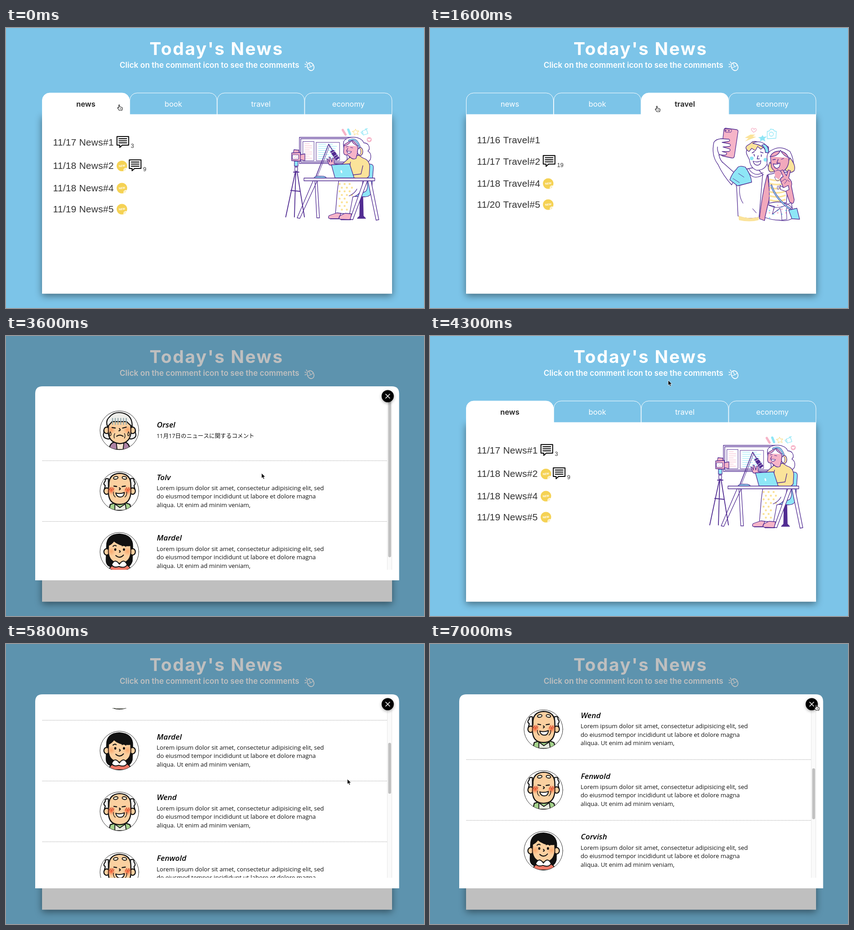
An HTML page with a canvas for the animation above (7.1 s loop, 916 by 612 pixels).

```html
<!DOCTYPE html>
<html lang="en">
<head>
<meta charset="utf-8">
<title>Today's News</title>
<style>
html, body { margin: 0; width: 100%; height: 100%; overflow: hidden; background: #7cc4e8; }
canvas { display: block; }
</style>
</head>
<body>
<canvas id="stage" width="916" height="612"></canvas>
<script>
const ctx = document.getElementById('stage').getContext('2d');
const LOOP = 7100, SKY = '#7cc4e8', INK = '#512c92', PINK = '#f6b4c8', CYAN = '#8ee6f6', YELLOW = '#fbe39a';
const ROSE = '#f1a8bc', SKIN = '#fbd0a0', BLACK = '#111';
const HEAD = 'Inter, sans-serif', LIST = '"Liberation Sans", Arial, sans-serif';
const BODY = '"Open Sans", "Noto Sans CJK JP", sans-serif';

const clamp = v => Math.max(0, Math.min(1, v));
const ease = v => { v = clamp(v); return v * v * (3 - 2 * v); };
const ramp = (t, from, to) => clamp((t - from) / (to - from));

function draw(d, fill, stroke = INK, width = 1.3) {
  const path = new Path2D(d);
  if (fill) { ctx.fillStyle = fill; ctx.fill(path); }
  if (stroke) { ctx.strokeStyle = stroke; ctx.lineWidth = width; ctx.stroke(path); }
}
function oval(x, y, rx, ry, fill, stroke = INK, width = 1.3, turn = 0) {
  ctx.beginPath();
  ctx.ellipse(x, y, rx, ry, turn, 0, Math.PI * 2);
  if (fill) { ctx.fillStyle = fill; ctx.fill(); }
  if (stroke) { ctx.strokeStyle = stroke; ctx.lineWidth = width; ctx.stroke(); }
}
function text(s, x, y, size, { family = BODY, weight = 400, color = '#333', align = 'left', spacing = 0, style = '' } = {}) {
  ctx.font = `${style} ${weight} ${size}px ${family}`;
  ctx.letterSpacing = spacing + 'px';
  ctx.textAlign = align;
  ctx.fillStyle = color;
  ctx.fillText(s, x, y);
}
function at(x, y, fn, turn = 0) {
  ctx.save();
  ctx.translate(x, y);
  ctx.rotate(turn);
  fn();
  ctx.restore();
}

function officeArt() {
  draw('M738 223l6 10', '', PINK, 5);
  draw('M750 222l4 10', '', CYAN, 5);
  draw('M766 221l2 4 5 0-3 4 2 4-5-2-4 3 0-5-4-3 5-1z', '', YELLOW);
  draw('M781 225l9-3 3 9-10 3zM781 226l-3 2 3 4M787 221l5-1', '', CYAN);
  oval(796, 244, 5.5, 5.5, PINK, null);
  draw('M796 247q-6-4-2-5l2 1q4-3 3 1z', '#fff', null);

  draw('M643 239h119v57h-119zM646 242h113v51h-113z', '#fff');
  draw('M651 248h24v42h-24zM680 250h51v40h-51z', '#fff', INK, 1);
  for (let i = 0; i < 8; i++) {
    draw(`M655 ${253 + i * 4.5}h${i % 3 ? 15 : 10}`, '', PINK, 1);
    draw(`M685 ${254 + i * 4.5}h${16 + i % 3 * 3}m5 0h${10 + i % 2 * 6}`, '', CYAN, 1);
  }

  draw('M791 298q15-3 14 8l-4 52q-2 11-15 11l-22-1v-8l20-1q7-1 8-12z', CYAN);
  draw('M776 369h6l1 42 5 5h-18l5-5z', INK);

  draw('M740 248c8-13 38-13 44 3 12 0 15 13 9 18 10 6 8 22-2 24l-44-4c4-15-11-23-7-41z', '#fff');
  draw('M753 283l20-5 9 6q14 4 15 18l-1 21q-8 11-22 7l-26-1 4-31-25 8-9-9 17 2z', YELLOW);
  draw('M782 301l-4 18-25 3M755 293l-3 15', '');
  draw('M753 283l-4-6q-11 3-9-11l1-11q8-5 16-10 13 6 15 22l-5 18q-7 4-14-4z', PINK);
  draw('M741 257q9 0 16-11 5 10 16 12', '#fff');
  draw('M745 260l5-1m5 2l5 1M749 263l-3 6 4 1', '', INK, 1.2);
  draw('M748 273q7 2 9-3l-9-1z', '#fff', INK, 1.2);
  draw('M752 246q16-9 24 17', '', INK, 4);
  draw('M752 246q16-9 24 17', '', CYAN, 2.3);
  oval(776, 270, 6, 9, YELLOW);
  oval(774, 270, 3.5, 7, '#fff', INK, 1);
  draw('M708 299l-5-13 3 1 3 6-1-11 3 1 3 10 2-9 3 1v11l7 2-3 4z', PINK);

  draw('M679 325l28-71 14 22', '', INK, 1.7);
  draw('M682 325l28-69', '', INK, 1);
  draw('M711 270l7-3 12 17-7 5z', INK);
  draw('M713 273l8-4m-3 12l8-5m-5 9l7-5', '', '#fff', 1);
  draw('M675 328q1-5 13-4 13-1 14 4z', CYAN);
  draw('M713 299l40-2 10 31h-42z', CYAN);
  draw('M721 328h44', '', INK, 2);
  oval(735, 314, 1.7, 3.2, '#fff', null, 0, -.2);

  draw('M729 334h53l-2 17q-7 16-20 18l-7 37-31-1 4-48z', '#fff');
  for (let i = 0; i < 24; i++) {
    const row = Math.floor(i / 3), x = 731 + i % 3 * 11 + row % 2 * 5, y = 341 + row * 8;
    if (y < 367 || x < 750) oval(x, y, 2.3, 2.3, YELLOW, null);
  }
  draw('M752 367q12-5 17-15', '');
  draw('M725 404l-17 6q-4 6 3 7h18l5-12zM743 405l-12 6q-4 6 2 7l22 1 2-13z', PINK);
  draw('M711 417h18m5 2h21', '', INK, 2);

  draw('M673 334l-35 81 6 1 38-82zM677 334l4 81h6l-5-81z', '#fff');
  draw('M784 334l-30 84 6 1 32-85zM793 334l18 86 6-1-17-85z', '#fff');
  draw('M653 328h155v6h-155z', '#fff');

  draw('M634 315l-21 98m22-98l-3 98m6-98l16 98M630 315h12M624 355l20 2', '', INK, 1.8);
  draw('M633 304h6v9h-6z', '#fff');
  draw('M632 291h8v11h-8z', CYAN);
  draw('M630 272l1-6 11 1v5M626 273l19-1v19l-19-1zM645 277l10-2v15l-10-2z', PINK);
  draw('M628 277h13v10h-13z', '#fff', INK, 1);
  draw('M631 284l6-5m-2 6l4-3', '', PINK, 1);
}

function selfieArt() {
  draw('M709 228q-8-7-3-9 3-1 4 3 3-4 5-1 2 3-6 7z', '', PINK);
  draw('M702 233l11 0-6 4 8 1-25 10 8-7-8-1z', YELLOW, null);
  draw('M729 234l2 4 7-1-5 5 2 6-6-3-6 3 1-6-5-3 7-1z', CYAN, null);
  draw('M739 226l5-1 2-4 7 1 1 3 5 1-1 15-19 1z', '', CYAN);
  oval(748, 232, 4.5, 4.5, '', CYAN);

  draw('M648 219l23 3q5 1 4 5l-8 53q-1 5-6 4l-19-4q-5-1-4-6l6-51q1-4 4-4z', PINK);
  draw('M647 221h12q4 3 0 7h-11q-4-3-1-7z', PINK, INK, 1);
  oval(648, 224.5, 1.5, 1.5, INK, null);
  oval(655, 224.5, 1.5, 1.5, INK, null);
  draw('M622 250q4-7 16-8l17 1q4 3-1 5l-14 2 16 3q5 3 0 6l-14 1 14 4q4 3-1 6l-15 0 10 3q1 4-4 5l-13-1q3 14 11 19l28 25-11 22q-19-21-30-45-15-19-9-48z', '#fff');
  draw('M630 260q-1 8 4 17', '');

  draw('M690 309q-20 0-22 20l4 20 3 62q21 8 46 3l8-94-14-16z', '#fff');
  draw('M676 410q22 9 45 3l-1 7q-19 5-43 0z', YELLOW, null);
  draw('M698 307q12 20 32 9m-35-6q11 26 36 10M679 345q-3 23 7 38M707 395l8 9', '', INK, 1.1);
  draw('M691 304q-15-5-19 4-10 9-15 24l17 13q13-3 31-8-2-17-14-33z', CYAN);
  draw('M676 318l12 8m-24 3l14 9', '', INK, 1);

  draw('M697 264q-7 5-1 16l4 8q2 18 16 23 23 0 25-25l1-26-19-9q-14 5-26 13z', '#fff');
  draw('M699 270q-11-7-4-13l8-5q4-6 15-3l17 8-10 8-7-6-5 9-8-5z', YELLOW);
  draw('M707 252q15-8 28 3 8 5 7 17l-7 0q2-14-28-20z', '#fff');
  draw('M733 254q10 5 9 19l-7-1q0-10-8-16z', CYAN);
  oval(705, 285, 4, 4, CYAN, null);
  oval(735, 288, 4, 4, CYAN, null);
  draw('M710 276l1 4m15-3v4M719 279l-2 7 5 0M706 273l5-3m13 1l6 2', '', INK, 1.6);
  draw('M708 291q10 4 17-1 0 10-8 10-7-1-9-9z', '#fff');

  draw('M739 288q-3-16 12-22 18-10 38 4 8 15 8 33-5 14-15 13l-36-6q-10-11-7-22z', '#fff');
  draw('M789 284q14 17 9 28-10 9-21-3zM745 293q-8 16 1 22l10-1z', YELLOW);
  draw('M746 280q6-11 19-11 15 1 21 15 2 20-13 30-18 5-25-10z', ROSE);
  draw('M745 281q18 0 23-14 6 13 20 17', '#fff');
  draw('M751 288l6-1m13 0l5-2M763 287l-3 8 4 0', '', INK, 1.3);
  draw('M752 297q9 2 15-2 0 11-7 12-6-1-8-10z', '#fff');

  draw('M739 321q-11 40-17 96l11 4 12-55-5-44z', ROSE);
  draw('M741 320l12-2 9-8 15 8 8 9-4 55-38 2q2-36-2-64z', '#fff');
  for (let i = 0; i < 6; i++) draw(`M745 ${331 + i * 9}q18 5 33-1`, '', YELLOW, 3.5);
  draw('M755 314l8-3 8 7-6 13-9-5z', ROSE, null);
  draw('M755 325q5 17 14 3', '', INK, 1);
  draw('M774 348l-5-12q-3-9 5-11l-6-13 5-2 8 13 4-13 5 2-4 16q9 7 6 18l6 29q-1 14-10 5l-9-26z', ROSE);
  draw('M770 336l8-6 4 4-5 6M783 332l5 4', '', INK, 1);
  draw('M767 344l8 5 10-5 2 9-8 4-11-4z', '#fff');
  oval(763, 349, 2, 4, '#fff', INK, 1);
  draw('M741 384q22-8 43 1l8-3 5 32q-13 10-32 6-16 0-31-6z', '#fff');
  for (let i = 0; i < 16; i++) oval(744 + i % 5 * 9, 388 + Math.floor(i / 5) * 8 + i % 2 * 3, 1.7, 1.7, i % 2 ? CYAN : PINK, null);
  draw('M741 386q20 13 43-1l10 8-13 1 1 24-11 2q0-15-4-26l-17 13 5-17z', '', INK, 1.1);
  draw('M748 344q9 29 43 53', '', INK, 4);
  draw('M748 344q9 29 43 53', '', CYAN, 2);
  draw('M786 398l18-4 6 24-17-1z', CYAN);
}

function blush(color) {
  for (const x of [-18, 18]) {
    const glow = ctx.createRadialGradient(x, -1, 1, x, -1, 10);
    glow.addColorStop(0, color);
    glow.addColorStop(1, 'rgba(250,150,90,0)');
    oval(x, -1, 10, 10, glow, null);
  }
}
function ears() {
  oval(-28, 0, 6, 7, SKIN, BLACK, 2.3);
  oval(29, 0, 6, 7, SKIN, BLACK, 2.3);
}
function grandpa() {
  draw('M-23 42l3-13 17-5h12l14 5 4 13z', '#a5d38c', BLACK, 2.2);
  draw('M-10 28l11 8 12-8 2 14h-25z', '#e8eadf', BLACK, 1.8);
  draw('M-24-27q-8-2-7 5-6 6 0 10l-2 8 9 2zM24-27q9-3 8 5 5 6 0 10l2 8-9 2z', '#eee', BLACK, 2.2);
  ears();
  draw('M-23-13q-1-24 23-26 26 1 25 27v16q-2 25-25 25T-24 4z', SKIN, BLACK, 2.4);
  blush('rgba(242,85,45,.85)');
  oval(-8, -29, 5, 3, '#f5ead5', BLACK, 1.8, -.2);
  oval(11, -29, 5, 3, '#f5ead5', BLACK, 1.8, .2);
  draw('M-12-11l6 1m12 0l7-1M0-7q4 2 0 4', '', BLACK, 2.3);
  draw('M-22-3l4-5m0 6l4-6m0 6l2-4M13-2l3-6m1 6l4-6m0 6l3-5', '', '#c83e27', 1.3);
  draw('M-8 4q9 3 19-1-1 10-9 10T-8 4z', '#fff', BLACK, 2);
  draw('M-13 2q-1 7 4 11M16 2q1 7-4 11', '', BLACK, 1.3);
}
function grandma() {
  draw('M-22 42q0-15 14-17h17q13 2 14 17z', '#ad83a5', BLACK, 2.2);
  draw('M-7 26l2 16h13l2-16z', '#f8e7d5', BLACK, 1.8);
  draw('M-23-4q-13-2-11 9-4 10 6 13 8 3 11-5zM24-4q13-2 11 9 4 10-6 13-8 3-11-5z', '#eee', BLACK, 2.2);
  ears();
  draw('M-24-15q5-23 26-22 22 1 23 22v22q-3 21-24 22-23-2-25-22z', SKIN, BLACK, 2.4);
  blush('rgba(245,140,75,.65)');
  draw('M-26-8q-5-13 4-21 11-13 29-9 22 5 21 30l-7-6-5-5-32 0z', '#eeeeea', BLACK, 2.2);
  for (let x = -15; x <= 15; x += 6) draw(`M${x}-26v13`, '', '#8fa6aa', 2.2);
  draw('M-16-6l7 1m16 0l8-2M0-4q4 4-1 5M-6 13q7-5 14 0', '', BLACK, 2.2);
  draw('M-10 7q-3 5-1 10m22-10q3 5 0 10M-20 3q-4 8 0 9 4-2 0-9M20 3q-4 8 0 9 4-2 0-9', '', BLACK, 1.4);
}
function girl() {
  draw('M-28-13q0-25 28-26 30 2 29 28l-1 31q-4 14-17 14h-23q-17-1-17-16z', BLACK, BLACK, 2);
  draw('M-24 42q3-12 16-15h19q13 3 15 15z', '#ef7967', BLACK, 2);
  ears();
  draw('M-24-14q7-3 12-10 15 13 37 10v16q-2 23-24 23-24-1-25-24z', SKIN, BLACK, 2.2);
  blush('rgba(247,150,85,.6)');
  draw('M-14-12q4-4 7-1m13 0q4-4 8 1M0-3q4 3 0 4M-8 8q9 8 17-1', '', BLACK, 2.1);
  oval(-9, -5, 2.3, 2.8, BLACK, null);
  oval(10, -5, 2.3, 2.8, BLACK, null);
  draw('M0 27q-10-14-17 1 4 8 16 4 13 5 18-4-7-15-17-1z', '#fff', BLACK, 2);
}

const LOREM = [
  'Lorem ipsum dolor sit amet, consectetur adipisicing elit, sed',
  'do eiusmod tempor incididunt ut labore et dolore magna',
  'aliqua. Ut enim ad minim veniam,'
];
const PEOPLE = [
  ['Orsel', grandma], ['Tolv', grandpa], ['Mardel', girl],
  ['Wend', grandpa], ['Fenwold', grandpa], ['Corvish', girl]
];
const ITEM = 132.8, VIEW_TOP = 140, VIEW = 371;

// Each row: text, baseline, badge x, comment icon x, comment count
const PANELS = {
  news: { art: officeArt, rows: [
    ['11/17 News#1', 257, 0, 242, '3'], ['11/18 News#2', 308, 254, 269, '9'],
    ['11/18 News#4', 356.5, 254], ['11/19 News#5', 402.5, 254]] },
  book: { rows: [
    ['11/16 Book#1', 251], ['11/17 Book#2', 298], ['11/18 Book#4', 346, 254], ['11/20 Book#5', 392, 254]] },
  travel: { art: selfieArt, rows: [
    ['11/16 Travel#1', 251.5], ['11/17 Travel#2', 298.5, 0, 247, '19'],
    ['11/18 Travel#4', 346.5, 259], ['11/20 Travel#5', 392.5, 259]] }
};

function badge(x, y) {
  oval(x, y, 11.5, 11.5, '#f5d254', null);
  at(x, y, () => text('NEW', 0, 2, 6, { weight: 700, color: '#fff', align: 'center' }), -.12);
  draw(`M${x + 4} ${y + 10}q0-6 6-5z`, '#f5d254', '#fff', 1.2);
}
function commentIcon(x, y, count, dim) {
  ctx.globalAlpha = dim ? .6 : 1;
  at(x, y, () => {
    draw('M1.200 1.200h25.600v18.800h-14l-5.500 5v-5h-6.100z', '#fff', '#000', 2);
    for (let i = 0; i < 3; i++) draw(`M5.5 ${6 + i * 4.5}h17`, '', '#000', 1.8);
  });
  text(count, x + 31.5, y + 26, 12.5, { family: LIST });
  ctx.globalAlpha = 1;
}

function header() {
  text("Today's News", 314.5, 58.5, 38.5, { family: HEAD, weight: 700, color: '#fff', spacing: 2.4 });
  text('Click on the comment icon to see the comments', 249, 87, 17, { family: HEAD, weight: 600, color: '#fff' });
  at(667.5, 84.5, () => {
    oval(0, 0, 7, 9, '', '#fff', 1.7);
    draw('M-7-1q7 3 14 0M0-9v9', '', '#fff', 1.3);
  }, -.45);
  draw('M655 85l3-1M655 79l3 1M658 74l2 3', '', '#fff', 1.4);
}

function page(tab, cursor) {
  ctx.fillStyle = SKY;
  ctx.fillRect(0, 0, 916, 612);
  header();
  ctx.save();
  ctx.shadowColor = 'rgba(0,0,0,.45)';
  ctx.shadowBlur = 15;
  ctx.shadowOffsetY = 5;
  ctx.fillStyle = '#fff';
  ctx.fillRect(79, 188.5, 767, 392);
  ctx.restore();

  ['news', 'book', 'travel', 'economy'].forEach((name, i) => {
    const active = name === tab, x = 79.5 + i * 191.75;
    draw(`M${x} 189v-31a16 16 0 0 1 16-16h159a16 16 0 0 1 16 16v31`, active ? '#fff' : SKY, '#fff', 1);
    text(name, x + 95.5, 172, 16.3, { family: HEAD, weight: active ? 600 : 400, color: active ? '#222' : '#fff', align: 'center' });
  });
  ctx.fillStyle = '#fff';
  ctx.fillRect(79, 188.5, 767, 392);

  const { rows, art } = PANELS[tab];
  for (const [label, y, badgeX, iconX, count] of rows) {
    text(label, 103, y, 20.6, { family: LIST, spacing: .25 });
    if (badgeX) badge(badgeX, y - 6.5);
    if (iconX) commentIcon(iconX, y - 21, count, overIcon(cursor, iconX, y - 21));
  }
  if (art) art();
}

function comment(index, cy, day) {
  const [name, face] = PEOPLE[index];
  const lines = index ? LOREM : [`11月${day}日のニュースに関するコメント`];
  ctx.save();
  ctx.beginPath();
  ctx.arc(248.5, cy, 42.5, 0, Math.PI * 2);
  ctx.clip();
  at(248.5, cy, face);
  ctx.restore();
  oval(248.5, cy, 42.5, 42.5, '', '#333', 1);
  text(name, 330.5, cy - 6 - 9.2 * (lines.length - 1), 17, { weight: 600, color: '#000', style: 'italic' });
  lines.forEach((line, i) =>
    text(line, 330, cy + 16.4 + 18.4 * (i - (lines.length - 1) / 2), index ? 13.15 : 12.4, { color: '#111' }));
  ctx.setLineDash([1.5, .8]);
  draw(`M79 ${cy + 66.4}H835`, '', '#bbb', .8);
  ctx.setLineDash([]);
}

function modal(alpha, count, day, scroll) {
  ctx.save();
  ctx.globalAlpha = alpha;
  ctx.fillStyle = 'rgba(0,0,0,.25)';
  ctx.fillRect(0, 0, 916, 612);
  draw('M64 534V126q0-16 16-16h765.500q16 0 16 16V534z', '#fff', null);

  ctx.save();
  ctx.beginPath();
  ctx.rect(79, VIEW_TOP, 767, VIEW);
  ctx.clip();
  PEOPLE.slice(0, count).forEach((_, i) => {
    const cy = 206.2 + i * ITEM - scroll;
    if (cy > 90 && cy < 580) comment(i, cy, day);
  });
  ctx.fillStyle = '#fafafa';
  ctx.fillRect(835, VIEW_TOP, 11, VIEW);
  draw('M835.5 140v371M845.500 140v371', '', '#e8e8e8', 1);
  const ratio = VIEW / (count * ITEM);
  ctx.beginPath();
  ctx.roundRect(837.5, VIEW_TOP + 2 + scroll * ratio, 6.5, VIEW * ratio - 4, 3.2);
  ctx.fillStyle = '#c1c1c1';
  ctx.fill();
  ctx.restore();

  ctx.shadowColor = 'rgba(0,0,0,.35)';
  ctx.shadowBlur = 6;
  ctx.shadowOffsetY = 2;
  oval(836.5, 131.5, 13.3, 13.3, '#000', null);
  ctx.shadowColor = 'transparent';
  draw('M832 127l9 9m0-9l-9 9', '', '#fff', 1.5);
  ctx.restore();
}

// Pointer stops: time, x, y
const STOPS = [
  [0, 250, 174], [150, 250, 174], [600, 345, 176], [1000, 350, 177], [1500, 499, 177], [1900, 500, 177],
  [2350, 225, 172], [2450, 225, 172], [2750, 258, 245], [3050, 258, 245], [3400, 560, 300], [3700, 560, 300],
  [4050, 522, 97], [4350, 522, 97], [4750, 283, 300], [4950, 283, 300], [5300, 748, 295], [6500, 748, 296],
  [6900, 848, 139], [7100, 848, 139]
];
function pointer(t) {
  const i = STOPS.findIndex((s, n) => n && t <= s[0]);
  const [t0, x0, y0] = STOPS[i - 1], [t1, x1, y1] = STOPS[i];
  const k = ease((t - t0) / (t1 - t0));
  return { x: x0 + (x1 - x0) * k, y: y0 + (y1 - y0) * k };
}
const overIcon = (p, x, y) => p.x > x && p.x < x + 28 && p.y > y && p.y < y + 26;

function drawPointer(p, open) {
  const hand = open
    ? Math.hypot(p.x - 836.5, p.y - 131.5) < 16
    : (p.y > 142 && p.y < 188 && p.x > 79 && p.x < 846) || overIcon(p, 242, 236) || overIcon(p, 269, 287);
  at(p.x, p.y, () => {
    if (hand) {
      draw('M-2 6l-3.500-5q0-2 2.500-.5v-6q1-1.500 2 0v3.500l5 1.500q1.500 1 1 3l-1 3.500z', '#fff', '#222', 1.2);
      draw('M0 1.500v2m2-2v2', '', '#222', .8);
    } else {
      draw('M0 0v11l2.500-2.300 1.800 4.100 2-.9-1.800-3.900h3.500z', '#000', '#fff', .8);
    }
  });
}

function render(t) {
  ctx.lineJoin = ctx.lineCap = 'round';
  const p = pointer(t);
  const tab = t >= 700 && t < 1550 ? 'book' : t >= 1550 && t < 2400 ? 'travel' : 'news';
  const first = ramp(t, 3000, 3200) * (1 - ramp(t, 4100, 4250));
  const second = ramp(t, 4900, 5100);
  page(tab, p);
  if (first) modal(first, 3, 17, 0);
  if (second) modal(second, 9, 18, 3 * ITEM * 1.05 * ease(ramp(t, 5500, 6050)));
  drawPointer(p, first || second);
}

function tick() {
  render(performance.now() % LOOP);
  requestAnimationFrame(tick);
}
tick();
</script>
</body>
</html>
```
